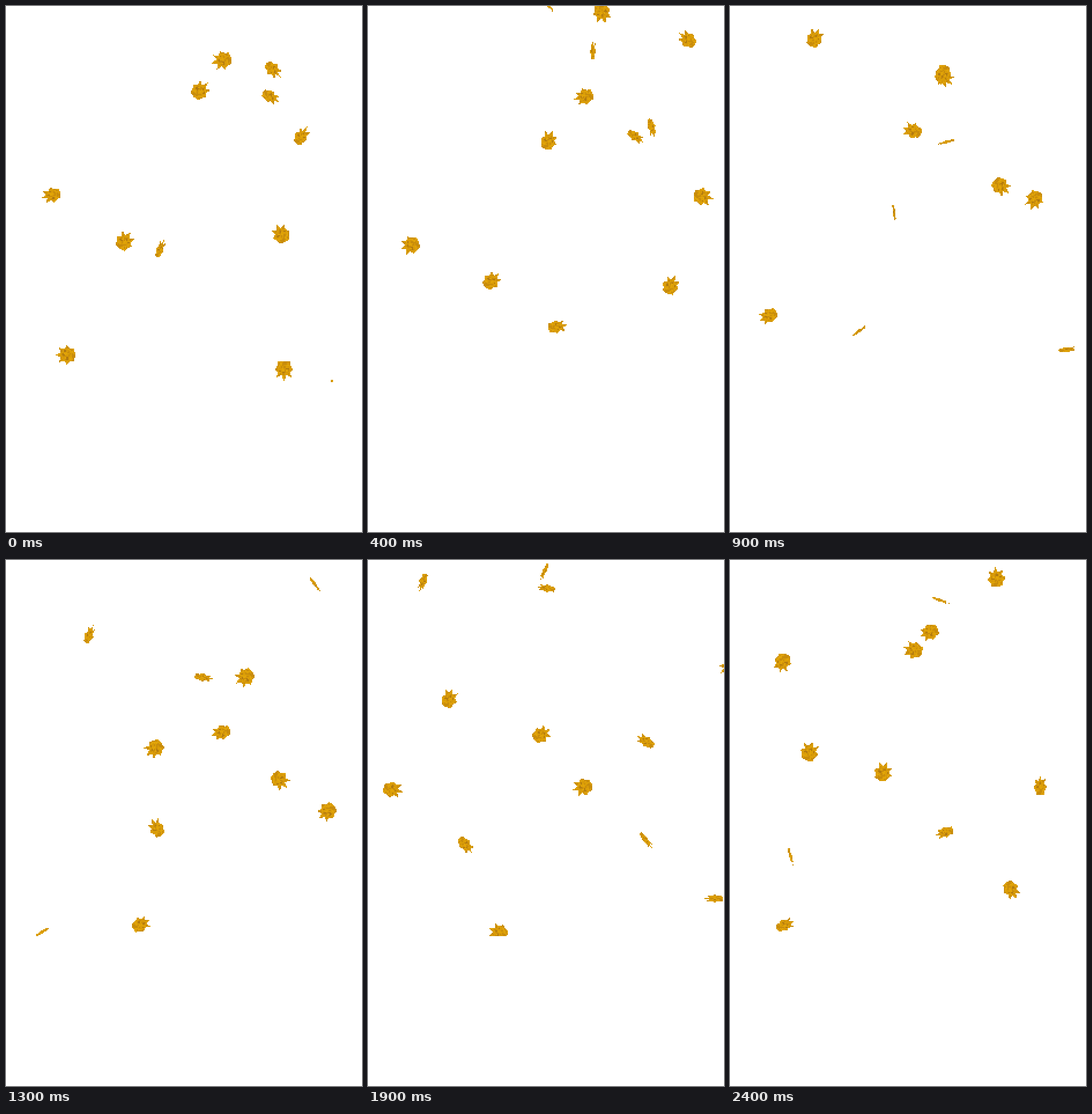
These frames come from a looping animation (616 by 909 pixels, 2.5 s). An HTML page with a canvas:

```html
<!DOCTYPE html>
<html lang="en">
<head>
<meta charset="utf-8">
<title>Falling leaves</title>
<style>
html, body { margin: 0; width: 100%; height: 100%; overflow: hidden; background: #fff; }
canvas { display: block; }
</style>
</head>
<body>
<canvas id="stage" width="616" height="909"></canvas>
<script>
const ctx = document.getElementById('stage').getContext('2d');
const LOOP = 2.5, FPS = 10, CELL = 2, FLOOR = 650, REACH = 20;
const FLIP = 1.7; // seconds between two edge-on moments
const SHADES = ['#e2a508', '#dc9f07', '#d89a08', '#c88c0b', '#b27a0f'];

// Half of a maple leaf, tip to the right; the other half is mirrored.
const half = [[19, 0], [9, 4], [13, 13], [4, 10], [-1, 16], [-8, 11], [-14, 10], [-16, 0]];
const outline = new Path2D();
for (const [x, y] of half) outline.lineTo(x, y);
for (const [x, y] of half.slice().reverse()) outline.lineTo(x, -y);
outline.closePath();

// A leaf has a place, a speed per second and a tip direction, all at time 0,
// a moment when it is seen edge-on, and perhaps a growing or fading fall.
// Leaves that come later begin outside the stage.
const leaves = [];
const leaf = (x, y, vx, vy, tip, edge = -FLIP / 2, pull = 0) =>
  leaves.push({ x, y, vx, vy, tip, edge, pull });

leaf(374, 94, -1, 157, 165, .9);
leaf(458, 157, 12, 172, 30, .25);
leaf(462, 110, 72, 250, 45, .3);
leaf(336, 146, -58, 205, -45, .9, 30);
leaf(511, 225, 170, 262, -58, -.3);
leaf(79, 327, -14, 205, 165, 1.3, 30);
leaf(205, 406, 22, 172, -55, .9);
leaf(267, 420, 150, 335, -68, .1);
leaf(476, 394, 120, 222, -115, .95);
leaf(104, 603, -30, 200, 180);
leaf(481, 629, 10, 180, 90);
leaf(564, 663, 60, 220, -90);
leaf(496, -36, 142, 234, 161);
leaf(448, -34, -147, 277, 330, .45);
leaf(433, -90, -70, 267, 100, 1.4, -32);
leaf(268, -104, 112, 271, 0, .4, -27);
leaf(152, -110, -6, 184, -60, 1.43);
leaf(340, -264, 150, 236, -142, 1.3);
leaf(-195, -44, 125, 232, 135, 2.4);
leaf(110, -490, -8, 278, 125, 1.8);
leaf(153, -379, 80, 210, -37, 1.87);
leaf(274, -358, 18, 214, 155, 1.8);
leaf(432, -430, 12, 192, -125, 1.5);
leaf(365, -434, 0, 210, 20, 2.4);

function shade(x, y) {
  const n = Math.sin(Math.floor(x / 3) * 12.99 + Math.floor(y / 3) * 78.23) * 43758.5;
  const core = Math.hypot(x, y) < 9 ? 1 : .8;
  return SHADES[Math.floor((n - Math.floor(n)) * core * SHADES.length)];
}

function drawLeaf(l, t) {
  const x = l.x + l.vx * t;
  const y = l.y + l.vy * t + l.pull * t * t;
  // Leaves roll the way they drift and turn over at a steady pace.
  const angle = (l.tip + l.vx * t) * Math.PI / 180;
  const turn = Math.abs(Math.sin((t - l.edge) / FLIP * Math.PI));
  const flat = Math.max(.17, Math.sqrt(turn));
  const c = Math.cos(angle), s = Math.sin(angle);
  const snap = n => Math.floor(n / CELL) * CELL;
  const bottom = Math.min(FLOOR, y + REACH);
  for (let py = snap(y - REACH); py < bottom; py += CELL) {
    for (let px = snap(x - REACH); px < x + REACH; px += CELL) {
      const dx = px + CELL / 2 - x, dy = py + CELL / 2 - y;
      const lx = dx * c + dy * s, ly = (dy * c - dx * s) / flat;
      if (!ctx.isPointInPath(outline, lx, ly)) continue;
      ctx.fillStyle = shade(lx, ly);
      ctx.fillRect(px, py, CELL, CELL);
    }
  }
}

function frame(now) {
  const t = Math.floor(now / 1000 % LOOP * FPS) / FPS;
  ctx.fillStyle = '#fff';
  ctx.fillRect(0, 0, 616, 909);
  for (const l of leaves) drawLeaf(l, t);
  requestAnimationFrame(frame);
}
requestAnimationFrame(frame);
</script>
</body>
</html>
```
